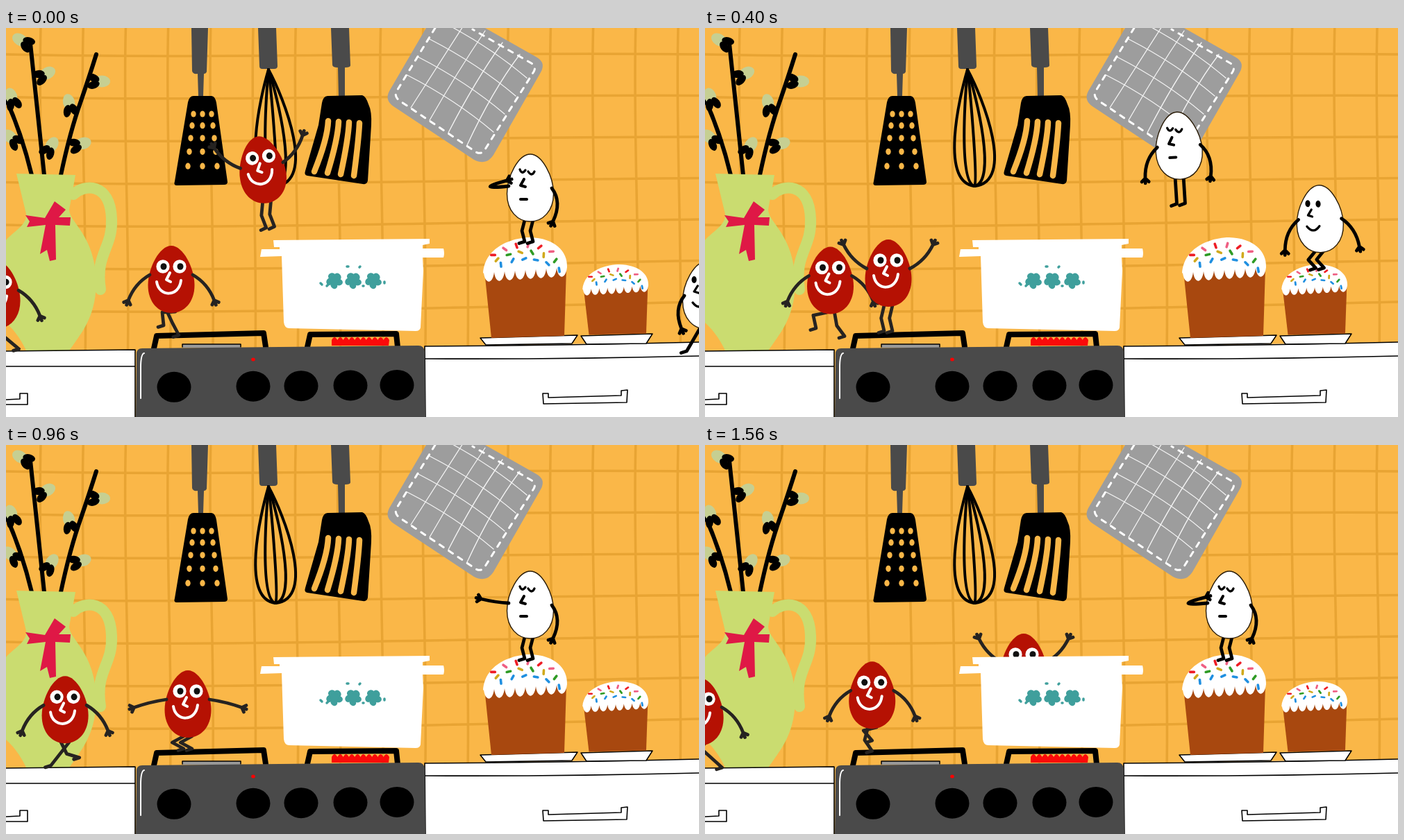
Write an HTML page with a canvas that moves like this. It is 998 px wide and 561 px high and loops after 1600 ms.

```html
<!DOCTYPE html>
<html lang="en">
<head>
<meta charset="utf-8">
<title>Kitchen eggs</title>
<style>
  html, body { margin: 0; height: 100%; overflow: hidden; }
  canvas { display: block; width: 100%; height: 100%; }
</style>
</head>
<body>
<canvas width="998" height="561"></canvas>
<script>
const canvas = document.querySelector('canvas');
const LOOP = 1600, STEP = 40, RAD = Math.PI / 180;
const WALL = '#fab748', GROUT = '#e8a433', STEEL = '#4a4a4a', LIME = '#cadc70', TEAL = '#3f9f9c';
let c;

const clamp = v => Math.min(1, Math.max(0, v));
const mix = (a, b, k) => a + (b - a) * k;
const fill = (d, color) => { c.fillStyle = color; c.fill(new Path2D(d)); };
const line = (d, color, width) => { c.strokeStyle = color; c.lineWidth = width; c.stroke(new Path2D(d)); };
const oval = (x, y, rx, ry, color, turn = 0) => {
  c.fillStyle = color;
  c.beginPath();
  c.ellipse(x, y, rx, ry, turn, 0, 7);
  c.fill();
};
const at = (x, y, turn, draw, sx = 1, sy = 1) => {
  c.save();
  c.translate(x, y);
  c.rotate(turn);
  c.scale(sx, sy);
  draw();
  c.restore();
};

// ---- scenery ----
function wall() {
  fill('M0 0H998V561H0Z', WALL);
  for (let i = 0; i < 16; i++) {
    const x = 50 + i * 61.2;
    line(`M${x} 0C${x - 4} 150 ${x + 6} 300 ${x + 3} 470`, GROUT, 3.5);
  }
  for (let i = 0; i < 7; i++) {
    const y = 38 + i * 61.5;
    line(`M0 ${y}C300 ${y + 7} 650 ${y - 4} 998 ${y - 2 * i}`, GROUT, 3.5);
  }
}

function utensils() {
  fill('M267 0H291L289 63Q288 66 285 66L284 98H277L276 66Q269 67 268 62Z', STEEL);
  fill('M270 98H296Q301 98 303 108L319 222Q319 226 314 226L246 227Q241 227 243 221L262 107Q264 98 270 98Z', '#000');
  for (let row = 0; row < 5; row++)
    for (let k = -1; k < 2; k++) oval(283 + k * (13 + row * 2), 124 + row * (16 + row * .7), 3.7, 4.6, WALL);

  fill('M363 0H389L391 55Q391 59 386 59H369Q365 59 365 55Z', STEEL);
  for (let i = 0; i < 5; i++) line(`M378 60C${366 + 8.5 * i} 100 ${338 + 27.5 * i} 222 388 228`, '#000', 4);

  fill('M468 0H494L496 54Q496 57 488 57L488 98H479L478 57Q470 57 470 53Z', STEEL);
  fill('M463 98L513 97Q518 98 522 110Q527 120 526 140L521 220Q520 226 514 225L434 213Q429 212 431 206L450 140L455 108Q457 98 463 98Z', '#000');
  for (let i = 0; i < 4; i++) line(`M${464 + 15 * i} ${134 + i}Q${463 + 15 * i} 160 ${444 + 19 * i} ${207 + 2 * i}`, WALL, 8.5);
}

function potHolder() {
  fill('M605 0H690L764 42Q778 50 770 64L702 183Q692 199 674 190L558 113Q545 104 552 91Z', '#9d9d9d');
  for (let i = 1; i < 5; i++) {
    line(`M${556 + i * 27} ${97 + i * 18}Q${600 + i * 25} ${35 + i * 14} ${640 + i * 25} ${-30 + i * 17}`, '#f4f4f4', 1.3);
    line(`M${562 + i * 16} ${94 - i * 26}Q${632 + i * 16} ${130 - i * 26} ${686 + i * 16} ${176 - i * 26}`, '#f4f4f4', 1.3);
  }
  c.setLineDash([7, 9]);
  line('M618 0L562 92Q559 99 567 105L677 179Q685 183 690 175L760 63Q764 56 757 51L672 2', '#fff', 3);
  c.setLineDash([]);
}

const bud = (x, y, turn) => at(x, y, turn, () => {
  oval(2, 0, 12, 8.5, '#c6cf92');
  oval(-10, -5, 9, 5.5, '#000', .4);
  oval(-10, 5, 9, 5.5, '#000', -.3);
});

function vase() {
  ['M35 22Q46 130 55 212', 'M130 38Q120 70 108 105Q92 150 79 212', 'M-2 98Q22 150 37 212'].forEach(d => line(d, '#000', 6));
  bud(22, 18, -2.6); bud(58, 66, -.5); bud(136, 77, 0); bud(8, 100, -1.9);
  bud(91, 109, -1.8); bud(7, 158, -2.4); bud(65, 170, -1); bud(109, 167, -.3);
  line('M97 240C112 225 150 222 152 275C154 318 128 325 136 377', LIME, 16);
  fill('M15 210L100 212L91 262C92 282 130 300 130 370C128 420 108 440 90 467H30C20 445 8 432 0 425V306C10 294 31 284 29 268Z', LIME);
  fill('M28 270L56 274L70 250L86 262L76 273L93 273L92 285L71 284L72 334L63 336L59 320L49 326L57 284L30 287L34 279Z', '#df1846');
}

function furniture() {
  fill('M0 466L186 464V561H0Z', '#fff');
  line('M0 466L186 464V561M0 488H186M0 536L20 535V527H31V543L0 543', '#000', 1.6);
  fill('M603 459L998 453V561H604Z', '#fff');
  line('M604 561L603 459Q800 458 998 453M604 477Q800 478 998 473M773 527H781V533L886 530V523L895 522L894 540L774 542Z', '#000', 1.6);

  line('M213 462L217 444L371 440L374 460M434 460L438 442L562 441L564 460', '#000', 8);
  fill('M254 456H338V461H254Z', '#999');
  line('M254 460V456H338V460', '#000', 1.5);
}

function stove() {
  fill('M196 462L594 458Q602 458 603 467L604 561H187L188 470Q188 462 196 462Z', STEEL);
  line('M199 469Q194 470 194 490V534', '#fff', 2);
  for (const x of [242, 356, 425, 496, 563]) oval(x, 520 - x / 110, 24.5, 22, '#000');
  oval(356, 478, 2.8, 2.5, '#f00');
}

function flames(t) {
  const phase = t * 3 / LOOP % 1;
  const top = phase > .15 && phase < .65
    ? 'M467 442' + 'q4 10 8.6 0'.repeat(10)
    : 'M469 450' + 'q4 -8 8.3 0'.repeat(10);
  fill(top + 'L551 458H469Z', '#fb0a0a');
}

function pot() {
  fill('M385 306L610 304V311L600 313V318H630Q632 325 630 331H600L601 350L597 432Q596 437 590 437L408 433Q401 433 400 424L397 329L366 330L368 319L394 319V316H386Z', '#fff');
  for (const x of [473, 500, 529]) {
    for (let a = 0; a < 5; a++) oval(x + 7 * Math.cos(a * 1.257 + .4), 364 + 7 * Math.sin(a * 1.257 + .4), 5.5, 4.7, TEAL, a);
    oval(x, 364, 6, 6, TEAL);
  }
  line('M453 368L455 370M545 366V368M491 344H493M509 345L510 344M462 372L464 370M514 372H515', TEAL, 3.5);
}

const CANDY = ['#ee1c24', '#1f8fe0', '#2f9b25', '#ef5f83', '#1f8fe0', '#d0a91c'];

function cake() {
  fill('M-59 48L59 44L56 142L-49 145Z', '#a8480f');
  fill('M-61 52C-58 10-13 0 7 0C42 1 61 20 60 43' + 'c-2 18-13 18-15 1'.repeat(8) + 'Z', '#fff');
  for (let i = 0; i < 18; i++) {
    const row = i % 3, x = (i - 8.3) * 5.6, y = 11 + row * 10 + x * x / 150, a = i * 2.3;
    const dx = 2.8 * Math.cos(a), dy = 2.8 * Math.sin(a);
    line(`M${x - dx} ${y - dy}L${x + dx} ${y + dy}`, CANDY[i * 5 % 6], 3.6);
  }
}

function cakes() {
  for (const d of ['M683 447L823 443L815 455L691 457Z', 'M828 444L931 441L922 455L836 456Z']) {
    fill(d, '#fff');
    line(d, '#000', 1.5);
  }
  at(748, 302, 0, cake);
  at(878, 341, 0, cake, .785, .7);
}

// ---- characters ----
// Blends the values of [time, ...values] key points; k is the progress inside the span.
function sample(points, u) {
  const i = points.findIndex(p => p[0] > u);
  if (i < 1) return { values: points.at(i).slice(1), next: points.at(i).slice(1), k: 0 };
  const [a, ...from] = points[i - 1], [b, ...next] = points[i], k = (u - a) / (b - a);
  return { values: from.map((v, n) => mix(v, next[n], k)), next, k };
}

// Route stops are [time, x, y, height of the hop that arrives there, tilt].
function place(route, u) {
  const { values: [x, y, , tilt], next, k } = sample(route, u);
  return [x, y - next[2] * 4 * k * (1 - k), tilt * RAD];
}

const red = {
  skin: '#b51103', ink: '#262321', hips: [-6, 6], shoulder: -6, shin: 19,
  route: [
    [-80, 500, 410, 0, 0], [-40, 459, 320, 0, 0], [0, 369, 204, 0, -8], [280, 288, 191, 36, 0],
    [400, 264, 353, 0, 0], [520, 264, 353, -12, 0], [640, 262, 369, 0, 0], [960, 262, 373, 0, 0],
    [1320, 257, 350, 0, 0], [1600, 238, 362, 0, 0], [1880, 195, 355, 6, 0], [2120, 166, 384, 6, 0],
    [2280, 128, 380, 0, 0], [3520, -62, 386, 0, 0]],
  reach: [[600, -46, -46], [700, -58, -58], [960, 14, 14], [1200, 50, 50]],
  ground: () => 438,
  stride: u => clamp((u - 1100) / 220),
  face(u) {
    if (u < 640 || u > 720) {
      for (const x of [-12, 12]) {
        oval(x, -18, 9.6, 9.8, '#fff');
        oval(x + 1, -18, 4.5, 4.8, '#111');
      }
    }
    line('M-2 -9L-7 1L-1 4M-21 4C-18 26 11 27 14 2', '#fff', 4);
  }
};

const white = {
  skin: '#fff', ink: '#000', hips: [-8, 4], shoulder: 1, shin: 16,
  route: [
    [0, 1008, 385, 0, 0], [280, 919, 254, 25, -11], [420, 880, 285, 12, 0], [520, 878, 283, 0, 0],
    [680, 769, 194, 40, 0], [800, 755, 230, 0, 0], [1920, 755, 230, 0, 0], [2120, 573, 150, 30, -9],
    [2280, 498, 315, 50, 8], [2360, 490, 430, 0, 8]],
  reach: [
    [0, 85, 85], [280, -115, -75], [420, 88, 88], [520, 88, 88], [680, 72, 72],
    [800, 88, 88], [1920, 88, 88], [2120, 56, 31], [2280, 40, -15]],
  ground: u => u < 120 ? 440 : u < 600 ? 346 : 308,
  stride: u => clamp(1 - u / 160),
  face(u) {
    if (u < 820) {
      oval(-17, -22, 3.6, 5, '#000');
      oval(-2, -21, 3.6, 5, '#000');
      line('M-12 -13L-17 -5L-11 -3M-19 11Q-10 23-1 11', '#000', 3.3);
    } else {
      line('M-15 -26Q-12 -18-7 -25M-3 -23Q2 -15 6 -23', '#000', 3.3);
      line('M-9 -12L-14 -3L-7 -1M-14 17L-5 17', '#000', 4);
    }
  }
};

// The thinking egg's left arm: elbow pull and hand.
const THINKING = [[960, -50, -3, -71, -8], [1320, -73, 16, -8, 17], [1580, -87, 2, -36, -13], [1880, -32, 28, 0, 31]];

function limb(sx, sy, bx, by, hx, hy, ink) {
  const angle = Math.atan2(hy - by, hx - bx);
  let d = `M${sx} ${sy}Q${bx} ${by} ${hx} ${hy}`;
  for (const spread of [-.8, 0, .8]) d += `M${hx} ${hy}l${7 * Math.cos(angle + spread)} ${7 * Math.sin(angle + spread)}`;
  line(d, ink, 4.8);
}

function arm({ shoulder, ink }, side, degrees) {
  const a = degrees * RAD, x = 31;
  limb(side * x, shoulder, side * (x + 25 * Math.cos(a * .6)), shoulder + 25 * Math.sin(a * .6),
    side * (x + 48 * Math.cos(a)), shoulder + 48 * Math.sin(a), ink);
}

// Two equal segments from hip to foot, with the knee pointing left.
function leg({ shin, ink }, hip, fx, fy) {
  const dx = fx - hip, dy = fy - 47, d = Math.hypot(dx, dy);
  const bend = Math.sqrt(Math.max(0, shin * shin - d * d / 4)) / d;
  line(`M${hip} 47L${hip + dx / 2 - dy * bend} ${47 + dy / 2 + dx * bend}L${fx} ${fy}l-8 2.5`, ink, 4.8);
}

function egg(actor, u) {
  const { route, hips, skin } = actor;
  if (u < route[0][0] || u > route.at(-1)[0]) return;
  const [x, y, tilt] = place(route, u);
  const [right, left] = sample(actor.reach, u).values;
  const planted = Math.min(84, actor.ground(u) - y), stride = actor.stride(u);
  at(x, y, tilt, () => {
    hips.forEach((hip, i) => {
      const phase = ((u - 2280) / 720 + .25 + i / 2) * 2 * Math.PI;
      const lift = 15 * Math.max(0, -Math.sin(phase));
      leg(actor, hip, mix(hip, -32 * Math.cos(phase), stride), mix(planted, 81 - lift, stride));
    });
    const shell = 'M0 -48C17 -48 33.5 -16 33.5 9C33.5 34 18 49 0 49C-18 49-33.5 34-33.5 9C-33.5 -16-17 -48 0 -48Z';
    fill(shell, skin);
    if (actor === white) line(shell, '#2a1c08', 1.4);
    actor.face(u);
    arm(actor, 1, right);
    if (actor === white && u > 820 && u < 1940) limb(-31, -2, ...sample(THINKING, u).values, actor.ink);
    else arm(actor, -1, left);
  });
}

// ---- rendering ----
const backdrop = document.createElement('canvas');
backdrop.width = 998;
backdrop.height = 561;
const contexts = [canvas, backdrop].map(el => el.getContext('2d'));
contexts.forEach(ctx => { ctx.lineCap = ctx.lineJoin = 'round'; });
c = contexts[1];
[wall, utensils, potHolder, vase, furniture, cakes, stove].forEach(draw => draw());
c = contexts[0];

function render(now) {
  const t = Math.floor(now % LOOP / STEP) * STEP;
  c.drawImage(backdrop, 0, 0);
  flames(t);
  for (const lap of [2, 1, 0, -1]) {
    egg(white, t + lap * LOOP);
    egg(red, t + lap * LOOP);
  }
  pot();
  requestAnimationFrame(render);
}
render(0);
</script>
</body>
</html>
```
